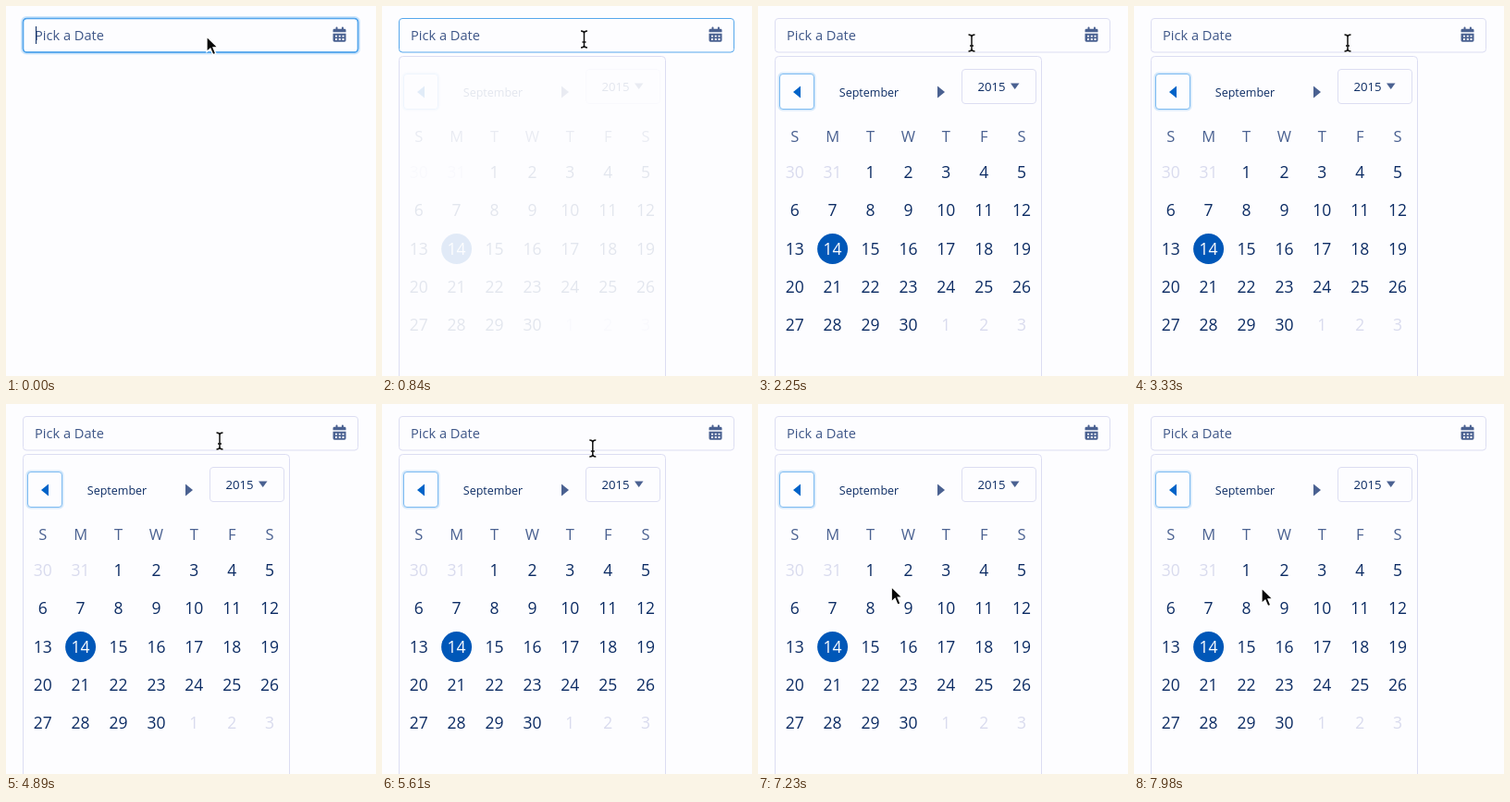
An HTML page for the animation above (8 s loop, 400 by 400 pixels).

```html
<!DOCTYPE html>
<html lang="en">
<head>
<meta charset="utf-8">
<title>Date picker</title>
<style>
  html, body { margin: 0; width: 100%; height: 100%; overflow: hidden; background: #fdfdff; }
  svg { display: block; width: 100vw; height: 100vh; }
  text { font-family: "Open Sans", "Noto Sans", sans-serif; font-weight: 500; fill: #0c2c64; }
  .mid { text-anchor: middle; }
  .day { font-size: 17.5px; }
  .weekday { font-size: 16.5px; fill: #4a6191; }
  .other { fill: #d9dbee; }
  .chosen { fill: #fff; }
  .line { fill: none; stroke: #dcddf2; }
  .gray { fill: #4a6191; }
  .field { animation: blur 8s linear infinite; }
  .glow { animation: glow 8s linear infinite; }
  .caret { animation: caret 8s step-end infinite; }
  .frame { animation: frame 8s linear infinite; }
  .content { animation: content 8s linear infinite; }
  @keyframes blur {
    0%, 10.5% { stroke: #55a6ec; }
    11.75%, 100% { stroke: #dcddf2; }
  }
  @keyframes glow { 0%, 9.5% { opacity: 1; } 10.4%, 100% { opacity: 0; } }
  @keyframes caret { 0% { opacity: 1; } 6.25%, 100% { opacity: 0; } }
  @keyframes frame { 0%, 9.4% { opacity: 0; } 10.5%, 100% { opacity: 1; } }
  @keyframes content { 0%, 10.15% { opacity: 0; } 13.5%, 100% { opacity: 1; } }
</style>
</head>
<body>
<svg viewBox="0 0 400 400">
  <g class="glow" fill="none">
    <rect x="17" y="12" width="365" height="39.5" rx="5" stroke="#cfe6fb" stroke-width="2"/>
    <rect x="18.5" y="13.5" width="362" height="36.5" rx="4" stroke="#3f9cec" stroke-width="1.6"/>
  </g>
  <rect class="line field" x="18.5" y="13.5" width="362" height="36.5" rx="3.5"/>
  <text x="31" y="36.5" font-size="14.6" style="fill:#3f5788">Pick a Date</text>
  <path class="caret" d="M32.5 22V41" stroke="#0c2c64"/>

  <g fill="#4a6191">
    <path d="M353.5 28.2V26.2q0-1.4 1.4-1.4h1.6v-1.2q0-1 1-1t1 1v1.2h4.4v-1.2q0-1 1-1t1 1v1.2h1.2q1.4 0 1.4 1.4v2z"/>
    <path d="M353.5 29.7h14v7.4q0 1.6-1.6 1.6h-10.8q-1.6 0-1.6-1.6z"/>
    <path d="M356 32.7h9.5M356 36h9.5" stroke="#fdfdff" stroke-width="1.8" stroke-dasharray="2 1.75"/>
  </g>

  <rect class="line frame" x="18.5" y="54.5" width="288" height="360" rx="4"/>
  <g class="content">
    <rect x="22.5" y="72.5" width="39" height="40" rx="4" fill="none" stroke="#d6e9fb" stroke-width="2"/>
    <rect x="23.5" y="73.5" width="37" height="38" rx="3.5" fill="none" stroke="#7dbbf1"/>
    <path d="M46 86.5V99.5L38 93z" fill="#0063c8"/>
    <text class="mid" x="120" y="98" font-size="12.5">September</text>
    <path class="gray" d="M194 86.5V99.5L202 93z"/>
    <rect class="line" x="220.5" y="68.5" width="80" height="37" rx="3.5"/>
    <text x="237.5" y="91.7" font-size="13.2">2015</text>
    <path class="gray" d="M273 83.5H282.5L277.7 90z"/>
    <circle id="hover" r="16" fill="#e9f2fb"/>
    <circle cx="80.6" cy="262.6" r="16.5" fill="#0057b8"/>
    <g id="grid"></g>
  </g>

  <g id="cursor">
    <path id="arrow" d="M0 0V16.5L3.9 13L6.8 19.7L9.8 18.4L7 11.8H12z" fill="#080808" stroke="#fff" stroke-width="1.3"/>
    <g id="beam" fill="none">
      <path d="M-3.5-9Q0-9 0-6.5Q0-9 3.5-9M0-6.5V6.5M-3.5 9Q0 9 0 6.5Q0 9 3.5 9M-2 3H2" stroke="#fff" stroke-width="3.2"/>
      <path d="M-3.5-9Q0-9 0-6.5Q0-9 3.5-9M0-6.5V6.5M-3.5 9Q0 9 0 6.5Q0 9 3.5 9M-2 3H2" stroke="#111" stroke-width="1.5"/>
    </g>
    <g id="hand" stroke="#101014" stroke-width="1.3" stroke-linejoin="round">
      <path d="M-2 1.5Q-1.5-.5.6.2Q1.5.7 2 2.2L4 6.8Q4.8 5 6.6 6.4Q7.6 5.3 9 7Q11 6.3 11.4 8.6L12 12.5Q12.2 15.5 10.7 17.2V19.5H3.3Q2.8 17.4.4 15.2L-4 11Q-5 9.5-3.6 8.6Q-2.3 8.2.8 10.7L-1.8 3.2Q-2.2 2.2-2 1.5z" fill="#fff"/>
      <path d="M4.8 13V16.5M7 13V16.5M9.2 13V16.5" fill="none" stroke-width="1"/>
    </g>
  </g>
</svg>
<script>
  const LOOP = 8000;
  const byId = id => document.getElementById(id);
  const colX = c => 39.7 + c * 40.9;
  const rowY = r => 180 + r * 41.2;

  function label(text, x, y, classes) {
    const node = document.createElementNS('http://www.w3.org/2000/svg', 'text');
    node.setAttribute('class', 'mid ' + classes);
    node.setAttribute('x', x);
    node.setAttribute('y', y);
    node.textContent = text;
    byId('grid').append(node);
  }

  [...'SMTWTFS'].forEach((name, c) => label(name, colX(c), 147, 'weekday'));
  for (let i = 0; i < 35; i++) {
    const day = i - 1;
    const text = day < 1 ? day + 31 : day > 30 ? day - 30 : day;
    const kind = day < 1 || day > 30 ? ' other' : day === 14 ? ' chosen' : '';
    label(text, colX(i % 7), rowY(Math.floor(i / 7)) + 6.2, 'day' + kind);
  }

  // time, x, y of the pointer
  const path = [
    [0, 217, 33], [300, 217, 33], [600, 218.5, 36], [900, 218.5, 36],
    [1350, 254, 36.5], [1500, 254, 36.5], [2000, 231, 40], [5500, 231, 40],
    [6300, 170, 191], [6800, 170, 191], [7400, 138, 199], [LOOP, 138, 199]
  ];

  function pointerAt(t) {
    const i = path.findIndex(p => p[0] > t);
    const [t0, x0, y0] = path[i - 1], [t1, x1, y1] = path[i];
    const k = (t - t0) / (t1 - t0), e = k * k * (3 - 2 * k);
    return [x0 + (x1 - x0) * e, y0 + (y1 - y0) * e];
  }

  const show = (id, on) => byId(id).style.display = on ? '' : 'none';

  function draw() {
    const t = performance.now() % LOOP;
    const [x, y] = pointerAt(t);
    const c = Math.round((x - colX(0)) / 40.9), r = Math.round((y - rowY(0)) / 41.2);
    const onDay = r >= 0 && Math.hypot(x - colX(c), y - rowY(r)) < 16;
    const onField = y < 51 && t >= 300;
    byId('cursor').setAttribute('transform', `translate(${x} ${y})`);
    byId('hover').setAttribute('transform', `translate(${colX(c)} ${rowY(r)})`);
    show('hover', onDay);
    show('hand', onDay);
    show('beam', onField);
    show('arrow', !onDay && !onField);
    requestAnimationFrame(draw);
  }
  draw();
</script>
</body>
</html>
```
